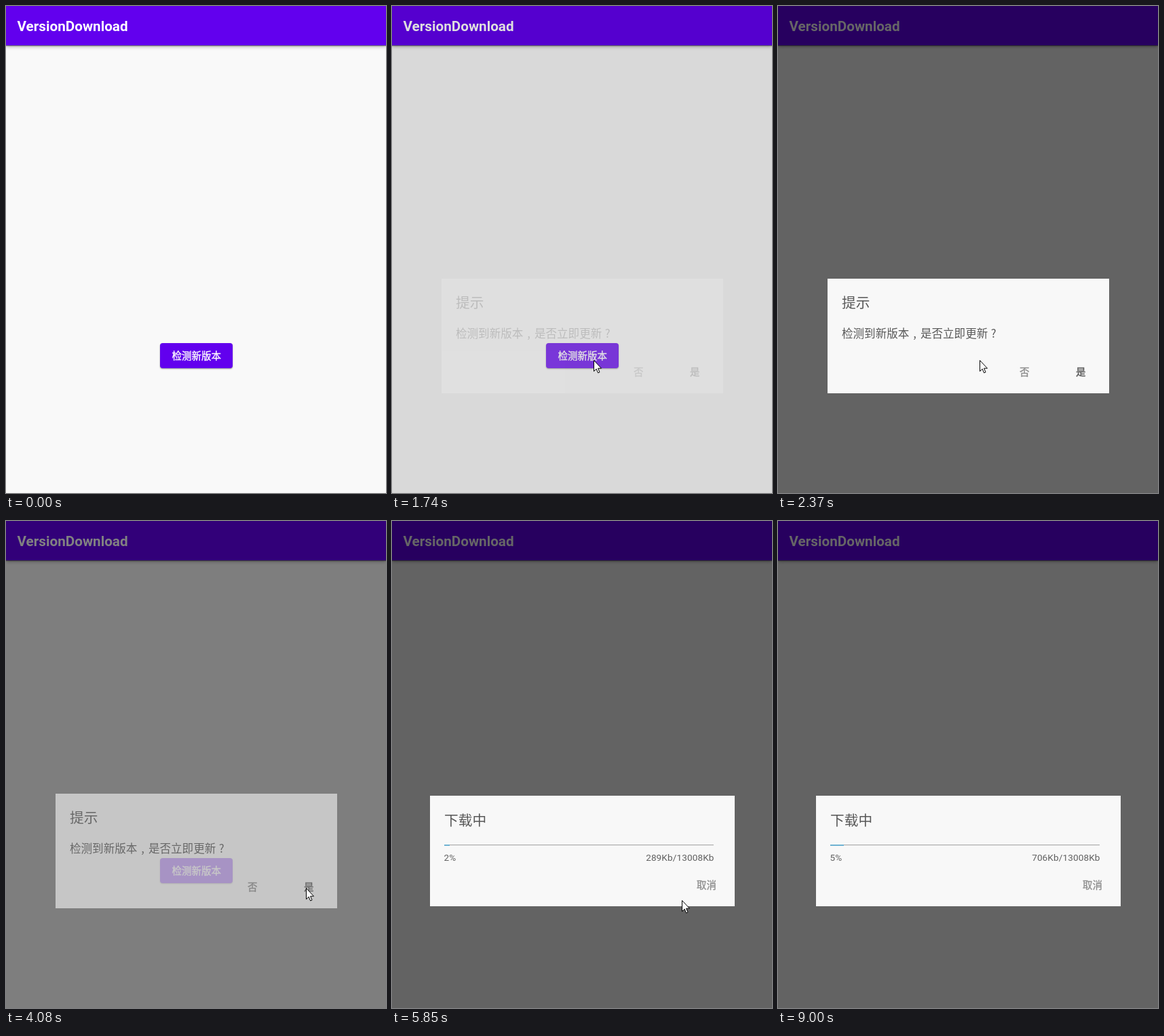
An HTML page that plays this animation: 560x718 px, repeating every 9030 ms.

```html
<!DOCTYPE html>
<html lang="zh-CN">
<head>
<meta charset="utf-8">
<title>VersionDownload</title>
<style>
html, body { margin: 0; width: 100%; height: 100%; overflow: hidden; background: #f9f9f9; }
#stage { position: absolute; left: 0; top: 0; width: 560px; height: 718px; overflow: hidden; background: #f9f9f9; }
#stage div, #stage svg { position: absolute; }
.bar {
  left: 0; top: 0; width: 560px; height: 58px; background: #6200ee;
  box-shadow: 0 1px 1px rgba(0,0,0,.4), 0 2px 5px rgba(0,0,0,.3);
}
.t { white-space: nowrap; line-height: 24px; font-family: "Noto Sans CJK SC", "Noto Sans CJK", sans-serif; }
.app { left: 16.5px; top: 18px; color: #fff; font: 700 20.7px/24px Roboto, sans-serif; }
.btn {
  left: 227px; top: 497px; width: 106.5px; height: 37px; border-radius: 4px; background: #6200ee;
  box-shadow: 0 1px 2px rgba(0,0,0,.42);
}
.btn .t { left: 17.5px; top: 6px; color: #fff; }
#press { inset: 0; border-radius: 4px; background: rgba(255,255,255,.06); }
#dim { inset: 0; background: #000; }
.dialog { background: #f8f8f8; color: #585858; }
#ask { left: 73px; top: 402px; width: 415px; height: 169px; }
#load { left: 56px; top: 405px; width: 449px; height: 163px; }
.head { left: 21px; font-size: 20.7px; }
.msg { left: 21px; top: 68px; font-size: 16.57px; }
.msg span { display: inline-block; width: 1em; text-align: center; }
.act { font-size: 14.5px; -webkit-text-stroke: .35px currentColor; }
.soft { color: #8e8e8e; }
.track { left: 21px; top: 72px; width: 397px; height: 1px; background: #adadad; box-shadow: 0 1px 0 rgba(0,0,0,.06); }
#fill { left: 0; top: -.5px; height: 2px; background: #6fb2d2; }
.num { top: 79px; font: 400 13.6px/24px Roboto, sans-serif; letter-spacing: .1px; color: #606060; }
#pct { left: 20.5px; }
#size { right: 30.5px; }
#cursor { left: 0; top: 0; overflow: visible; }
</style>
</head>
<body>
<div id="stage">
  <div class="bar"></div>
  <div class="t app">VersionDownload</div>
  <div class="btn"><div id="press"></div><div class="t act">检测新版本</div></div>
  <div id="dim"></div>
  <div id="ask" class="dialog">
    <div class="t head" style="top:22px">提示</div>
    <div class="t msg">检测到新版本<span>,</span>是否立即更新<span>?</span></div>
    <div class="t act soft" style="left:283px;top:125px">否</div>
    <div class="t act" style="left:366px;top:125px">是</div>
  </div>
  <div id="load" class="dialog">
    <div class="t head" style="top:23px">下载中</div>
    <div class="track"><div id="fill"></div></div>
    <div class="t num" id="pct"></div>
    <div class="t num" id="size"></div>
    <div class="t act soft" style="left:393px;top:119px">取消</div>
  </div>
  <svg id="cursor" width="12" height="20" viewBox="0 0 12 20">
    <path d="M.5 .5V16.6L4.2 13.1 6.6 18.9 9 17.9 6.6 12.2H11.5Z" fill="#fff" stroke="#000"/>
  </svg>
</div>
<script>
const LOOP = 9030, STEP = 30, TOTAL = 13008;
const $ = id => document.getElementById(id);

// Cursor moves: time span, bend and end point of a quadratic curve
const HOME = [548, 180];
const MOVES = [
  { from: 150, to: 840, bend: [400, 588], end: [297, 522] },
  { from: 2370, to: 2880, bend: [345, 490], end: [438, 540] },
  { from: 3510, to: 3690, bend: [440, 540], end: [442, 541] },
  { from: 5100, to: 5490, bend: [437, 550], end: [427, 559] },
  { from: 7350, to: 7770, bend: [455, 590], end: [544, 595] },
];

const span = (t, from, to) => Math.min(1, Math.max(0, (t - from) / (to - from)));
const easeOut = k => 1 - (1 - k) ** 2;
const easeInOut = k => (1 - Math.cos(Math.PI * k)) / 2;

function cursorAt(t) {
  let pos = HOME;
  for (const { from, to, bend, end } of MOVES) {
    const k = easeInOut(span(t, from, to)), r = 1 - k;
    pos = pos.map((p, i) => r * r * p + 2 * r * k * bend[i] + k * k * end[i]);
  }
  return pos.map(Math.round);
}

function draw(t) {
  const fadeIn = span(t, 1650, 1920) ** 1.4;
  const fadeOut = easeOut(span(t, 4050, 4180));
  const swap = easeOut(span(t, 4050, 4290));
  $("ask").style.opacity = fadeIn * (1 - fadeOut);
  $("load").style.opacity = span(t, 4080, 4290) ** 1.4;
  // The shade lightens briefly while the dialogs change over
  $("dim").style.opacity = .6 * fadeIn - .157 * Math.sin(Math.PI * swap);
  $("press").style.opacity = t >= 1410 && t < 1620 ? 1 : 0;

  // A fast start, then a steady rate
  const kb = Math.round(Math.max(0, Math.min((t - 4470) * .2375, 289 + (t - 5850) * .1324)));
  const pct = Math.floor(kb / TOTAL * 100);
  $("fill").style.width = pct + "%";
  $("pct").textContent = pct + "%";
  $("size").textContent = `${kb}Kb/${t < 4500 ? 0 : TOTAL}Kb`;

  const [x, y] = cursorAt(t);
  $("cursor").style.visibility = t >= 150 && t < 7800 ? "visible" : "hidden";
  $("cursor").style.transform = `translate(${x}px, ${y}px)`;
}

const start = performance.now();
function tick() {
  const t = (performance.now() - start) % LOOP;
  draw(Math.floor(t / STEP) * STEP);
  requestAnimationFrame(tick);
}
tick();
</script>
</body>
</html>
```
